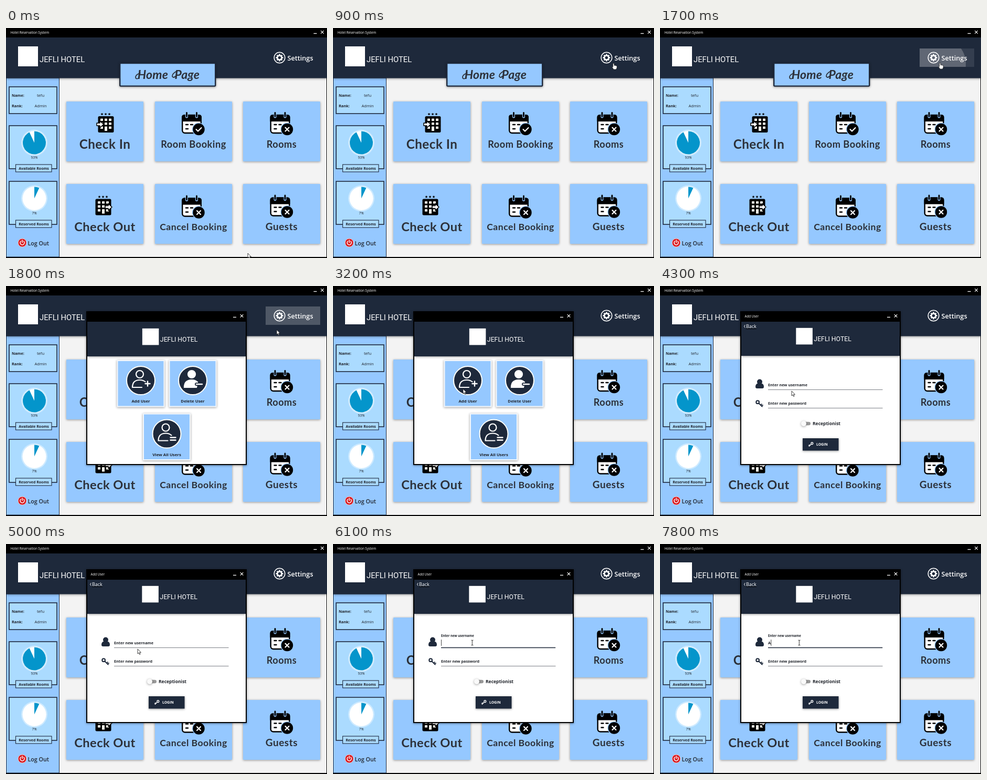
An HTML page for the animation above (8000 ms loop, 612 px wide and 438 px high).

```html
<!DOCTYPE html>
<html lang="en">
<head>
<meta charset="utf-8">
<title>Hotel Reservation System</title>
<style>
  html, body { margin: 0; width: 100%; height: 100%; overflow: hidden; background: #000; }
  svg { display: block; width: 612px; height: 438px; }
  text { font-family: "Open Sans", "Noto Sans", sans-serif; fill: #20242b; }
  .b { font-weight: 700; }
  .s { font-weight: 600; }
  .m { text-anchor: middle; }
  .w { fill: #fff; }
  .card { font-family: Lato, sans-serif; font-weight: 700; letter-spacing: .5px; fill: #2c3038; text-anchor: middle; }
  .title { font-style: italic; letter-spacing: .2px; word-spacing: 7px; }
  .brand { font-family: Roboto, sans-serif; fill: #fff; }
  .soft { filter: drop-shadow(0 1.5px 2px rgba(0, 0, 0, .4)); }
  .line { fill: none; stroke-linecap: round; stroke-linejoin: round; }
</style>
</head>
<body>
<svg id="stage" viewBox="0 0 612 438" xmlns="http://www.w3.org/2000/svg"></svg>
<script>
const LOOP = 8000, NAVY = '#1e293b', BLUE = '#95c8ff', PALE = '#abdbff', PIE = '#0495cb';
const stage = document.getElementById('stage');

const rect = (x, y, w, h, fill, more = '') =>
  `<rect x="${x}" y="${y}" width="${w}" height="${h}" fill="${fill}" ${more}/>`;
const circle = (x, y, r, fill, more = '') =>
  `<circle cx="${x}" cy="${y}" r="${r}" fill="${fill}" ${more}/>`;
const text = (x, y, size, cls, s) =>
  `<text x="${x}" y="${y}" font-size="${size}" class="${cls}">${s}</text>`;
const line = (d, color, width) =>
  `<path class="line" d="${d}" stroke="${color}" stroke-width="${width}"/>`;
const shape = (d, fill) => `<path d="${d}" fill="${fill}"/>`;
const at = (x, y, body, more = '') => `<g transform="translate(${x} ${y}) ${more}">${body}</g>`;
const group = (id, body) => `<g id="${id}">${body}</g>`;

const windowButtons = (x, y) =>
  rect(x, y, 6, 1.3, '#fff') + line(`M${x + 14} ${y - 4.5}l5 5m0 -5l-5 5`, '#fff', 1.1);

const brand = (x, y, k) => at(x, y,
  rect(1, 1, 38, 38, '#fff') +
  `<text x="42" y="31" font-size="14.8" class="brand">JEFLI HOTEL</text>`, `scale(${k})`);

const star = (x, y) => {
  const points = Array.from({ length: 10 }, (_, i) => {
    const a = i * Math.PI / 5, r = i % 2 ? 1.2 : 2.8;
    return `${(x + r * Math.sin(a)).toFixed(2)},${(y - r * Math.cos(a)).toFixed(2)}`;
  });
  return `<polygon points="${points.join(' ')}"/>`;
};

const building = (x, y, arrowX) => {
  let s = [-7, 0, 7].map(dx => star(dx, 0)).join('');
  s += rect(-14.5, 4, 30, 31, '#000', 'rx="2.5"');
  for (const row of [8.5, 16, 23.5])
    for (const col of [-10, -2, 6]) s += rect(col, row, 5, 4.5, '#f3f3ea', 'rx=".5"');
  s += rect(-2, 25, 5, 7, '#f3f3ea');
  const d = `M${arrowX} 17h6v-4l7 6.5l-7 6.5v-4h-6z`;
  s += `<path d="${d}" fill="#fff" stroke="#000" stroke-width="1.5" stroke-linejoin="round"/>`;
  return at(x, y, s);
};

const calendar = (x, y, mark) => at(x, y,
  rect(1.2, 6, 35.6, 34, '#fff', 'rx="5" stroke="#000" stroke-width="2.4"') +
  shape('M0 18V10q0 -5 5 -5h28q5 0 5 5v8z', '#000') +
  line('M9.5 2v7M28.5 2v7', BLUE, 5) + line('M9.5 1.5v7M28.5 1.5v7', '#000', 2.8) +
  line('M8 24h4M17 24h4M26 24h4M8 32h4', '#000', 2.4) +
  circle(32.5, 33, 12.6, BLUE) + circle(32.5, 33, 11.2, '#000') +
  line(mark === 'check' ? 'M27.5 33l3.5 3.5l6.5 -6.5' : 'M29 29.5l7 7m0 -7l-7 7', '#fff', 2.2));

const tile = (x, y, label, size, icon) =>
  rect(x, y, 147, 114, BLUE, 'class="soft" rx="1"') + icon +
  text(x + 73.5, y + (size > 20 ? 89.5 : 88), size, 'card', label);

const pie = (y, share) => {
  const r = 22;
  const p = f => `${54 + r * Math.sin(f * 2 * Math.PI)} ${y - r * Math.cos(f * 2 * Math.PI)}`;
  const wedge = `M54 ${y}L${p(0)}A${r} ${r} 0 ${share > .5 ? 1 : 0} 1 ${p(share)}z`;
  return circle(54, y, 25, '#fff', 'opacity=".4"') + circle(54, y, r + .5, '#fff') +
    shape(wedge, PIE) + text(54, y + 30.5, 6.5, 'm', Math.round(share * 100) + '%');
};

const panel = (y, h) =>
  rect(6, y, 91, h, PALE, `stroke="${NAVY}" stroke-width="1.6"`);
const chart = (y, share, label) =>
  panel(y, 82) + pie(y + 32.5, share) +
  rect(18.5, y + 74, 68.5, 14, PALE, `stroke="${NAVY}" stroke-width="1.1"`) +
  text(53, y + 83.6, 7, 'b m', label);

const gear = (x, y) => at(x, y,
  circle(0, 0, 10.3, 'none', 'stroke="#fff" stroke-width="1.5"') +
  circle(0, 0, 4.1, 'none', 'stroke="#fff" stroke-width="2.6"') +
  Array.from({ length: 8 }, (_, i) =>
    rect(-1.3, -7, 2.6, 2.4, '#fff', `transform="rotate(${i * 45})"`)).join(''));

const home =
  rect(0, 0, 612, 438, '#000') +
  text(8.5, 11.2, 6.2, 'w', 'Hotel Reservation System') + windowButtons(586.5, 9.8) +
  rect(0, 90, 611, 346, '#f3f3f3') +
  rect(.5, 95, 101, 341, BLUE, `stroke="${NAVY}"`) +
  rect(0, 18, 612, 77.5, NAVY, 'class="soft"') +
  brand(22, 34, 1) +
  `<clipPath id="settingsBox"><rect x="495" y="39" width="104" height="35"/></clipPath>` +
  group('hover', rect(495, 39, 104, 35, '#fff', 'opacity=".1"') +
    `<g clip-path="url(#settingsBox)">${at(534, 68, group('ripple', circle(0, 0, 1, '#fff', 'opacity=".22"')))}</g>`) +
  gear(521.5, 56.5) + text(536.5, 61.5, 12.7, 's w', 'Settings') +
  rect(217.2, 67, 182, 43.6, BLUE, `class="soft" rx="1.5" stroke="${NAVY}" stroke-width="2.4"`) +
  text(310, 97, 23, 'card title', 'Home Page') +
  line('M256 86q-8 2 -9 7q0 5 5 3', '#2c3038', 1.8) +
  line('M324 83q-7 4 -7 9q2 4 6 0', '#2c3038', 1.8) +
  panel(112, 51) +
  text(11, 130.5, 7.3, 'b', 'Name:') + text(66, 130.5, 7.6, 'm', 'tefu') +
  text(11, 151, 7.3, 'b', 'Rank:') + text(66, 151, 7.6, 'm', 'Admin') +
  chart(186, .93, 'Available Rooms') + chart(292, .07, 'Reserved Rooms') +
  circle(31, 409, 8, '#d8191f', 'stroke="#f3c8cc" stroke-width="1"') +
  line('M28.3 406a4 4 0 1 0 5.4 0M31 404v4.5', '#fff', 1.5) +
  text(41.5, 413.8, 10.7, 's', 'Log Out') +
  tile(115, 140, 'Check In', 24.2, building(190, 164, -17)) +
  tile(284, 140, 'Room Booking', 18.2, calendar(335, 160, 'check')) +
  tile(452, 140, 'Rooms', 18.2, calendar(503.5, 160)) +
  tile(115, 297, 'Check Out', 23.6, building(185, 321.5, 4)) +
  tile(284, 297, 'Cancel Booking', 17.6, calendar(335, 318.5)) +
  tile(452, 297, 'Guests', 19, calendar(503.5, 317.5));

const userButton = (x, y, label, filled, sign) => at(x, y,
  rect(-44.5, -38, 89, 87.5, BLUE, 'class="soft" stroke="#f4f8fd" stroke-width="2"') +
  circle(0, 0, 27, NAVY, 'stroke="#fff" stroke-width="2"') +
  `<g fill="${filled ? '#fff' : 'none'}" stroke="#fff" stroke-width="2.2" stroke-linecap="round">` +
  `<circle cx="-2" cy="-12" r="7"/>` +
  `<path d="M-16 13q0 -14 14 -14q7 0 11 4${filled ? 'l-2 10z' : 'M-16 13h18'}"/></g>` +
  line(sign, NAVY, 6) + line(sign, '#fff', 2.4) +
  text(0, 42.2, 7.8, 'b m', label));

const key = (x, y, k, color) => at(x, y,
  circle(-3, -3, 3, 'none', `stroke="${color}" stroke-width="2.2"`) +
  line('M-.5 -.5L6 6M3 3l2.2 -2M5.2 5.2l2 -2', color, 2), `scale(${k})`);

const menu =
  rect(155, 68, 302, 66, NAVY, 'class="soft"') + brand(259, 80, .83) +
  userButton(257, 180, 'Add User', false, 'M8.5 6h9M13 1.5v9') +
  userButton(356, 180, 'Delete User', true, 'M7 7h11') +
  userButton(306.5, 281.5, 'View All Users', false, 'M7 7h10M7 12h10');

const form =
  text(161.5, 60.2, 6.2, 'w', 'Add User') +
  rect(155, 68, 302, 65, NAVY, 'class="soft"') + brand(258.5, 79, .83) +
  line('M162 74.5l-1.5 2.3l1.5 2.3', '#fff', 1) +
  `<g text-decoration="underline">${text(164, 80, 9, 'w', 'Back')}</g>` +
  circle(190, 182.5, 5, NAVY) + shape('M182 192q0 -6 5 -6.5q3 2 6 0q5 .5 5 6.5q0 3 -3 3h-10q-3 0 -3 -3z', NAVY) +
  at(206, 191, group('label', text(0, 0, 7.25, 'b', 'Enter new username'))) +
  rect(206, 197, 218.5, 1, '#7c7f85') +
  at(315, 196.6, group('focus', rect(-109, 0, 218, 1.4, NAVY))) +
  group('typed', text(206, 191, 7.5, 'b', 'A')) +
  group('caret', rect(206, 182, .9, 12, '#333')) +
  key(189, 224, .95, NAVY) +
  text(206, 225.8, 7.25, 'b', 'Enter new password') + rect(206, 232, 218.5, 1, '#7c7f85') +
  rect(270, 258.7, 17, 6.6, '#999', 'rx="3.3"') + circle(274, 262, 5, '#fafafa', 'class="soft"') +
  text(291, 265.2, 8.5, 'b', 'Receptionist') +
  rect(272, 290, 68.5, 23.5, NAVY, 'class="soft"') +
  at(288, 301.5, key(0, 0, .62, '#fff'), 'scale(-1 1)') +
  text(298, 304, 6.8, 'b w', 'LOGIN');

const pointer =
  group('arrow', '<path d="M0 0v9l2.1 -1.8l1.5 3.2l1.5 -.7l-1.5 -3.1h2.8z" fill="#fff" stroke="#111" stroke-width=".8"/>') +
  group('hand', '<path d="M-1.3 1q1.3 -1.8 2.4 0v3.3q1.3 -.8 2 .2q1.4 -.5 2 .5q1.4 0 1.4 1.5q0 3.5 -1.8 5.5h-4.6l-3 -4.3q.4 -1.5 1.6 -.4z" fill="#fff" stroke="#111" stroke-width=".8"/>') +
  group('beam', line('M-1.5 -5q1.5 0 1.5 1v8q0 1 -1.5 1M1.5 -5q-1.5 0 -1.5 1m0 8q0 1 1.5 1', '#222', 1));

stage.innerHTML = home +
  group('dialog', rect(153, 48, 306, 293, '#000', 'class="soft"') + rect(155, 68, 302, 271, '#fff') +
    windowButtons(433, 58.8) + group('menu', menu) + group('form', form)) +
  group('cursor', pointer);

// Each step is [time, value, easing until the next step]; values hold by default.
const HOLD = 'steps(1, end)';
function play(id, prop, steps) {
  const frames = steps.map(([time, value, easing = HOLD]) => ({ offset: time / LOOP, [prop]: value, easing }));
  frames.push({ offset: 1, [prop]: steps.at(-1)[1] });
  document.getElementById(id).animate(frames, { duration: LOOP, iterations: Infinity });
}
const show = (id, first, ...toggles) =>
  play(id, 'opacity', [0, ...toggles].map((time, i) => [time, (i + first) % 2]));
const move = (x, y) => `translate(${x}px, ${y}px)`;

play('cursor', 'transform', [
  [0, move(461, 429)], [100, move(461, 429), 'ease-in-out'],
  [900, move(535, 67), 'ease-out'], [1300, move(534, 66)],
  [1700, move(534, 66), 'linear'], [1800, move(517, 83), 'ease-out'],
  [2300, move(248, 196)], [4000, move(248, 196), 'linear'],
  [4200, move(251, 200)], [5600, move(251, 200), 'ease-out'],
  [5900, move(265.5, 188)],
]);
show('arrow', 1, 850, 1800, 5800);
show('hand', 0, 850, 1800);
show('beam', 0, 5800);

play('hover', 'opacity', [[0, 0], [1500, 1], [1900, 1, 'linear'], [2300, 0]]);
play('ripple', 'transform', [[0, 'scale(0)'], [1500, 'scale(4)', 'linear'], [1700, 'scale(49)', 'linear'], [1800, 'scale(76)']]);
play('ripple', 'opacity', [[0, 1], [1700, 1, 'linear'], [1800, .6]]);

show('dialog', 0, 1800);
show('menu', 1, 4000);
show('form', 0, 4000);

play('label', 'transform', [[0, 'none'], [5900, 'translateY(0px) scale(1)', 'ease-out'], [6000, 'translateY(-14px) scale(.84)']]);
play('focus', 'transform', [[0, 'scaleX(0)'], [5900, 'scaleX(0)', 'ease-out'], [6100, 'scaleX(1)']]);
show('caret', 0, 6000, 6500, 7000);
play('caret', 'transform', [[0, move(0, 0)], [7300, move(5.3, 0)]]);
show('typed', 0, 7300);
</script>
</body>
</html>
```
